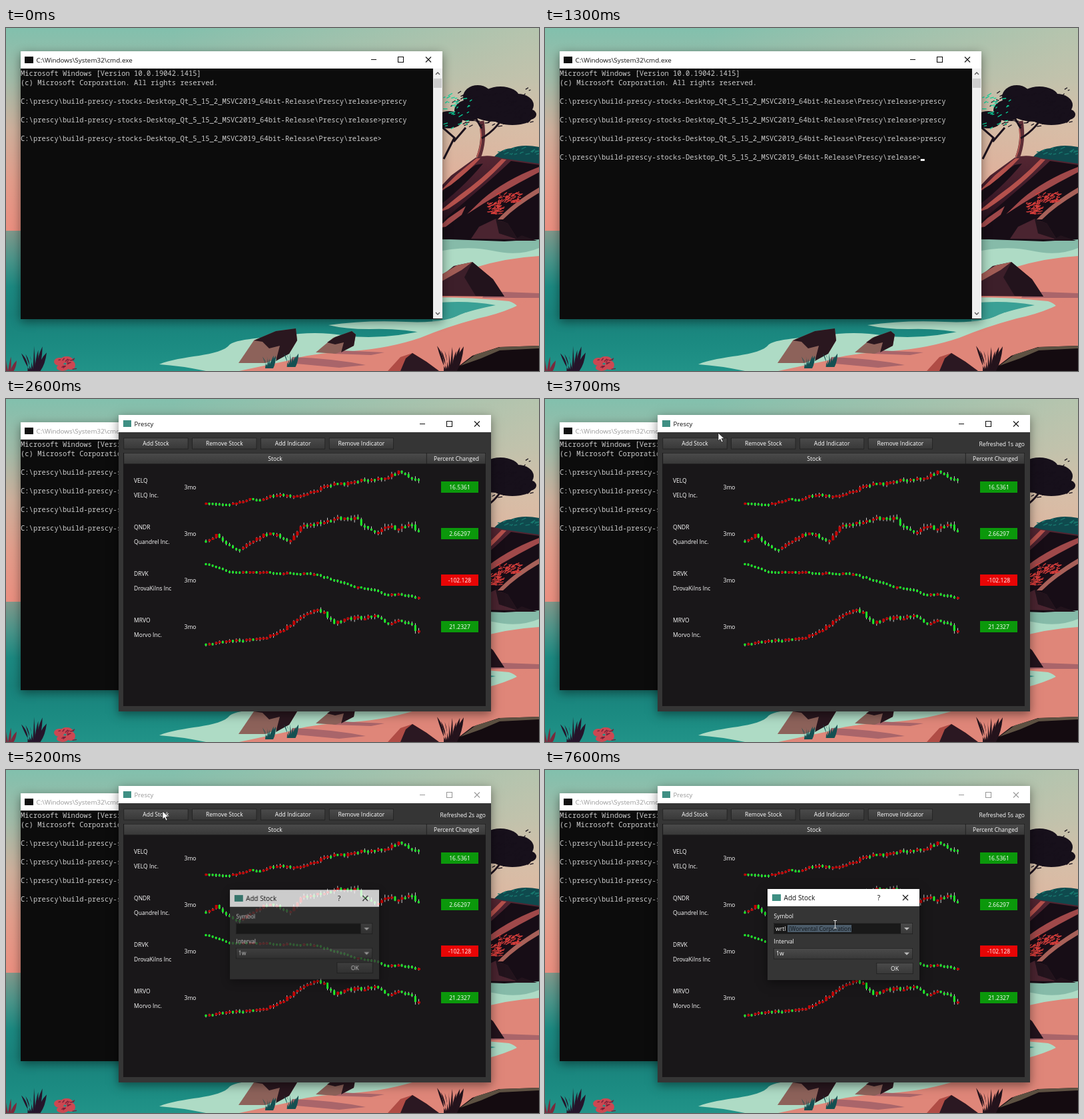
An HTML page with a canvas that plays this animation: 800 px wide and 516 px high, repeating every 8 s.

```html
<!DOCTYPE html>
<html lang="en">
<head>
<meta charset="utf-8">
<title>Stock watcher</title>
<style>
html, body { margin: 0; width: 100%; height: 100%; overflow: hidden; }
canvas { display: block; }
</style>
</head>
<body>
<canvas id="stage" width="800" height="516"></canvas>
<script>
const LOOP = 8000, STEP = 100;
const SANS = '"Open Sans", "Noto Sans", sans-serif';
const MONO = '"Noto Sans Mono", "DejaVu Sans Mono", monospace';
const PROMPT = 'C:\\prescy\\build-prescy-stocks-Desktop_Qt_5_15_2_MSVC2019_64bit-Release\\Prescy\\release>';
const STOCKS = [
  { symbol: 'VELQ', name: 'VELQ Inc.', change: '16.5361', noise: 6,
    ys: [157, 156, 158, 156, 150, 151, 146, 143, 146, 143, 138, 133, 128, 128, 123, 121, 120, 116, 109, 115, 124] },
  { symbol: 'QNDR', name: 'Quandrel Inc.', change: '2.66297', noise: 9,
    ys: [214, 204, 220, 227, 217, 207, 201, 207, 213, 187, 191, 183, 180, 181, 178, 193, 201, 186, 196, 184, 199] },
  { symbol: 'DRVK', name: 'DrovaKilns Inc', change: '-102.128', noise: 3,
    ys: [248, 253, 259, 259, 260, 260, 260, 262, 261, 262, 262, 267, 272, 277, 282, 285, 288, 295, 291, 296, 298] },
  { symbol: 'MRVO', name: 'Morvo Inc.', change: '21.2327', noise: 7,
    ys: [369, 366, 363, 363, 362, 360, 356, 350, 337, 325, 318, 319, 337, 332, 328, 330, 325, 336, 333, 340, 348] }
];
const MOUSE = [[3200, 330, 140], [3700, 260, 51], [4200, 240, 60], [4600, 235, 62], [5400, 235, 62], [6400, 435, 232]];

const stage = document.getElementById('stage').getContext('2d');
let g = stage, seed = 1;
const random = () => (seed = seed * 16807 % 2147483647) / 2147483647;
const newLayer = () => {
  const c = document.createElement('canvas');
  c.width = 800; c.height = 516;
  return c.getContext('2d');
};

function rect(x, y, w, h, fill) { g.fillStyle = fill; g.fillRect(x, y, w, h); }
function shape(fill, d) { g.fillStyle = fill; g.fill(new Path2D(d)); }
function line(color, width, d) { g.strokeStyle = color; g.lineWidth = width; g.stroke(new Path2D(d)); }
function gradient(y0, y1, ...colors) {
  const grad = g.createLinearGradient(0, y0, 0, y1);
  colors.forEach((c, i) => grad.addColorStop(i / (colors.length - 1), c));
  return grad;
}
function text(s, x, y, { size = 8.55, color = '#fff', align = 'left', font = SANS } = {}) {
  g.font = `${size}px ${font}`;
  g.fillStyle = color;
  g.textAlign = align;
  g.fillText(s, x, y + size * 0.357);
}
function ovals(fill, list) {
  g.fillStyle = fill;
  for (const [x, y, rx, ry] of list) {
    g.beginPath(); g.ellipse(x, y, rx, ry, 0, 0, 7); g.fill();
  }
}
function tuft(x, y, h, blades, fill) {
  for (let i = 0; i < blades; i++) {
    const a = (i / (blades - 1) - 0.5) * 2, len = h * (0.6 + 0.4 * random());
    shape(fill, `M${x + a * h * 0.2 - 2} ${y}Q${x + a * h * 0.2} ${y - len * 0.6} ${x + a * h * 0.5} ${y - len}Q${x + a * h * 0.4 + 2} ${y - len * 0.4} ${x + a * h * 0.2 + 2} ${y}z`);
  }
}
function speckle(color, n, x, y, w, h) {
  for (let i = 0; i < n; i++) {
    const px = x + random() * w, py = y + random() * h;
    line(color, 1.3, `M${px} ${py}l${2 + random() * 5} ${-random() * 4}`);
  }
}

function paintWallpaper() {
  seed = 11;
  rect(0, 0, 800, 306, gradient(0, 305, '#82c0ad', '#a0bba8', '#cfb09c', '#e39d8b', '#ea8f80'));
  const glow = g.createLinearGradient(250, 0, 780, 0);
  glow.addColorStop(0, 'rgba(222,200,175,0)');
  glow.addColorStop(1, 'rgba(222,200,175,.55)');
  rect(250, 0, 550, 306, glow);
  rect(0, 305, 800, 211, gradient(305, 516, '#80988b', '#4c958a', '#1c8981', '#19827b', '#1b8a81', '#219388'));

  // Far shore
  shape('#86bba9', 'M640 317H800V345L640 362z');
  shape('#aedbc5', 'M640 338Q690 326 730 335T800 331V360L640 402z');
  shape('#df8679', 'M800 343Q750 346 705 360L655 395L640 412L800 440z');

  // Foam and beach
  shape('#aedbc5', 'M640 405Q700 405 755 411Q775 418 765 428L690 446L640 468z');
  shape('#3aa095', 'M640 414Q690 409 735 417Q700 424 682 431Q660 442 640 445z');
  shape('#aedbc5', 'M484 447Q540 439 600 442T690 428V446L640 461Q590 451 545 453Q510 453 484 447z');
  shape('#aedbc5', 'M230 506C262 492 322 495 336 476C350 466 400 466 440 460Q475 457 510 463Q570 470 640 452V500L430 516H300Q262 508 230 506z');
  shape('#df8679', 'M800 398Q765 425 708 437Q660 450 622 466Q575 482 520 486Q452 490 425 500L350 516H800z');
  shape('#a9656a', 'M430 495Q490 497 540 507L500 511L425 504zM500 485L568 488L548 492L490 490zM720 396L800 399V406H715z');

  // Headland
  shape('#0f4a4e', 'M728 200Q740 182 758 181Q775 174 800 179V210H728z');
  speckle('#197a70', 18, 738, 182, 58, 10);
  shape(gradient(193, 318, '#552632', '#3a1927', '#170d16'), 'M640 252L668 222L705 195Q722 189 745 196L800 204V318H640z');
  shape('#170d16', 'M800 206L758 200Q735 222 702 250L658 288L640 306H800zM705 206L668 232L640 263V275Q685 242 716 204z');
  shape('#b4514c', 'M706 196L676 221L650 247L668 236Q694 216 712 196zM744 197Q715 227 680 252L648 278L664 272Q715 238 751 198z');
  shape('#a0494a', 'M800 209Q748 229 715 258L692 280Q740 248 800 217zM690 268L664 286L648 301L660 299L684 281z');
  shape('#a86159', 'M800 240Q762 262 738 288L746 288Q766 268 800 248z');
  speckle('#d93f3c', 55, 722, 264, 20, 16);
  speckle('#d93f3c', 55, 736, 249, 34, 14);
  shape('#170d16', 'M640 304H800V318L748 321L640 317z');
  shape('#4a2430', 'M698 317L710 299L735 287L753 294L768 318z');
  shape('#22131c', 'M735 287L753 294L768 318L740 309zM760 320L774 312L797 320z');

  // Trees
  line('#5c2c35', 7, 'M709 195Q719 170 714 140');
  line('#b05a54', 2, 'M707 194Q716 173 712 151');
  line('#1c121d', 3, 'M714 166Q739 151 750 126M714 151L697 121M657 197L673 165L650 145M672 171L690 150');
  ovals('#17101b', [[708, 104, 22, 18], [742, 103, 28, 15], [768, 116, 24, 17], [694, 124, 21, 16], [735, 126, 36, 15], [665, 138, 20, 13], [760, 137, 28, 9], [782, 130, 14, 9]]);
  speckle('#17101b', 110, 664, 92, 124, 58);
  speckle('#09d69c', 32, 656, 98, 40, 54);

  // Boulders
  shape('#3d1f2a', 'M640 403L650 376L672 358L700 352L731 378L748 404z');
  shape('#22131c', 'M700 352L731 378L748 404L705 403L688 375z');
  shape('#a05c55', 'M640 379L677 357L700 352L684 364L640 389z');
  shape('#8d625a', 'M349 504L372 470L405 456L435 452L437 470L425 490L390 504z');
  shape('#2a171f', 'M372 470L405 456L435 452L437 470L425 490L405 501L411 478L395 482L385 472z');
  shape('#8d625a', 'M465 488L491 466L519 456L525 461L522 478L495 490z');
  shape('#2a171f', 'M482 473L494 465L519 456L525 461L522 478L503 488L507 473L494 476z');
  shape('#b04c45', 'M573 516L592 495L610 489L631 502L650 516z');
  shape('#2b1822', 'M600 497L610 489L631 502L650 516H592z');
  shape('#140b10', 'M670 516L700 493L740 480L800 478V516z');
  shape('#5d5142', 'M682 508L705 491L742 480L800 478V482L741 485L713 497z');

  // Plants
  tuft(42, 516, 38, 7, '#25142a');
  tuft(3, 518, 26, 4, '#7a2a3c');
  tuft(667, 516, 40, 8, '#24131c');
  tuft(395, 512, 20, 7, '#155052');
  tuft(428, 510, 22, 6, '#155052');
  ovals('#cc4852', [[80, 502, 8, 6], [91, 499, 9, 5], [97, 507, 7, 7], [85, 511, 9, 5]]);
  speckle('#761f39', 13, 76, 496, 24, 20);
}

function frame(x, y, w, h, fill) {
  g.save();
  g.shadowColor = 'rgba(0,0,0,.45)';
  g.shadowBlur = 14;
  g.shadowOffsetY = 4;
  rect(x, y, w, h, fill);
  g.restore();
  rect(x, y, w, 26, '#fff');
}
function cross(x, y, color) { line(color, 1.1, `M${x - 4} ${y - 4}l8 8m0-8l-8 8`); }
function controls(x, y, color) {
  line(color, 1.1, `M${x - 4} ${y + 0.5}h8M${x + 36.5} ${y - 3.5}h8v8h-8z`);
  cross(x + 82, y + 0.5, color);
}
function panel(x, y, w, h, top = '#4b4b4b', bottom = '#383838') {
  rect(x, y, w, h, '#1d1d1d');
  rect(x + 0.7, y + 0.7, w - 1.4, h - 1.4, gradient(y, y + h, top, bottom));
}
function button(label, x, y, w, h) {
  panel(x, y, w, h);
  text(label, x + w / 2, y + h / 2, { align: 'center' });
}

function paintConsole(t) {
  const tint = t < 2400 ? '#111' : '#999';
  frame(22, 35, 633, 403, '#0c0c0c');
  rect(28, 43, 13, 10, '#111');
  text('C:\\Windows\\System32\\cmd.exe', 45.5, 48, { size: 9.85, color: tint });
  controls(552, 47, tint);
  rect(641, 61, 14, 376, '#f0f0f0');
  rect(642, 76, 12, 14, '#cdcdcd');
  line('#555', 1.3, 'M645 70l3-3l3 3M645 428l3 3l3-3');

  const typed = 'prescy'.slice(0, Math.max(0, (t - 400) / STEP));
  const lines = ['Microsoft Windows [Version 10.0.19042.1415]', '(c) Microsoft Corporation. All rights reserved.',
    '', PROMPT + 'prescy', '', PROMPT + 'prescy', '', PROMPT + typed];
  if (t >= 1200) lines.push('', PROMPT);
  lines.forEach((s, i) => text(s, 22, 68 + 14 * i, { size: 10.5, color: '#ccc', font: MONO }));
  const blinkOn = (t + 970) % 1060 < 530;
  if (blinkOn && t < 2400) rect(22 + 6.3 * lines.at(-1).length, 57 + 14 * lines.length, 6, 3, '#f2f2f2');
}

function paintCandles({ ys, noise }) {
  const count = 64;
  let last = ys[0] - 1;
  for (let i = 0; i < count; i++) {
    const u = i / (count - 1) * (ys.length - 1), k = Math.min(ys.length - 2, Math.floor(u));
    const spread = noise * (0.35 + 0.65 * i / count);
    const y = ys[k] + (ys[k + 1] - ys[k]) * (u - k) + (random() - 0.5) * spread;
    const x = 300 + i * 5.07, top = Math.min(y, last), height = Math.max(3, Math.abs(y - last));
    const up = random() * spread * 0.6, down = random() * spread * 0.6, rising = y < last;
    rect(x - 0.4, top - up, 0.9, height + up + down, '#ddd');
    rect(x - 1.5, top, rising ? 4 : 3, height, rising ? '#c40404' : '#1cf028');
    last = y;
  }
}

function paintApp(t) {
  const tint = t < 5100 ? '#111' : '#999';
  frame(169, 24, 559, 446, '#353535');
  rect(176, 32, 12, 10, '#3f8f83');
  text('Prescy', 192.5, 37.5, { size: 9.6, color: tint });
  controls(625, 37, tint);
  ['Add Stock', 'Remove Stock', 'Add Indicator', 'Remove Indicator']
    .forEach((label, i) => button(label, 176.5 + 102.8 * i, 58.5, 97, 17));
  if (t >= 3300) text(`Refreshed ${Math.floor((t - 2300) / 1000)}s ago`, 720, 67.5, { align: 'right' });

  rect(176, 81, 544, 381, '#191719');
  panel(176.5, 81, 455, 17);
  panel(631, 81, 89, 17);
  text('Stock', 404, 90, { align: 'center' });
  text('Percent Changed', 676, 90, { align: 'center' });
  seed = 77;
  STOCKS.forEach((stock, i) => {
    const y = 133 + 70 * i;
    text(stock.symbol, 192, y - 10);
    text(stock.name, 192, y + 11.5);
    text('3mo', 267.5, y);
    paintCandles(stock);
    rect(653, y - 9, 56, 17, stock.change[0] === '-' ? '#e80505' : '#0b980b');
    text(stock.change, 681, y, { align: 'center' });
  });
}

function paintDialog(t) {
  frame(334, 179, 228, 137, '#353535');
  rect(341, 187, 13, 10, '#3f8f83');
  text('Add Stock', 358.5, 192, { size: 10.1, color: '#111' });
  text('?', 501, 192, { size: 10.5, color: '#111', align: 'center' });
  cross(541, 192, '#111');
  text('Symbol', 343.5, 220);
  text('Interval', 343.5, 258);
  panel(343, 230, 209, 17);
  rect(344, 231, 190, 15, '#191919');
  panel(343, 268, 209, 16.5);
  shape('#bbb', 'M539 237h8l-4 4zM539 274.5h8l-4 4z');
  text('1w', 347, 276);
  button('OK', 497.5, 290, 55, 17);

  if (t >= 7600) {
    text('wrtl', 346, 239);
    rect(364, 233, 96, 11, '#4b5b69');
    text('(Worvental Corporation)', 366, 239, { color: '#12161a' });
  } else if (t >= 7000) {
    text(t < 7200 ? 'w' : 'wr', 346, 239);
  } else if (t > 5200 && (t - 5200) % 1060 < 530) {
    rect(346, 232, 1, 12, '#eee');
  }
}

function paintMouse(t) {
  if (t < MOUSE[0][0]) return;
  const next = MOUSE.findIndex(key => key[0] > t);
  let [, x, y] = MOUSE.at(-1);
  if (next > 0) {
    const [t0, x0, y0] = MOUSE[next - 1], [t1, x1, y1] = MOUSE[next];
    const p = (t - t0) / (t1 - t0), ease = p * p * (3 - 2 * p);
    x = x0 + (x1 - x0) * ease;
    y = y0 + (y1 - y0) * ease;
  }
  if (x > 343 && y > 229) {
    line('#ddd', 1, `M${x - 2} ${y - 5.5}h5M${x + 0.5} ${y - 5}v11M${x - 2} ${y + 6}h5`);
  } else {
    const arrow = `M${x} ${y}v12l3-2.6l2.2 4.7l2-1l-2.1-4.5h4z`;
    shape('#fff', arrow);
    line('#111', 0.7, arrow);
  }
}

// Windows open in three steps, growing and fading in together.
const scratch = newLayer();
function openWindow(paint, t, start, cx, cy) {
  if (t < start) return;
  const n = Math.min(3, (t - start) / STEP + 1), scale = 0.946 + 0.018 * n;
  g = scratch;
  g.clearRect(0, 0, 800, 516);
  paint(t);
  g = stage;
  g.save();
  g.globalAlpha = Math.min(1, 0.39 * n);
  g.translate(cx, cy);
  g.scale(scale, scale);
  g.drawImage(scratch.canvas, -cx, -cy);
  g.restore();
}

const wallpaper = g = newLayer();
paintWallpaper();
g = stage;

let shown = -1;
function tick(now) {
  const t = Math.floor(now % LOOP / STEP) * STEP;
  if (t !== shown) {
    shown = t;
    g.drawImage(wallpaper.canvas, 0, 0);
    paintConsole(t);
    openWindow(paintApp, t, 2400, 448.5, 247);
    openWindow(paintDialog, t, 5100, 448, 247.5);
    paintMouse(t);
  }
  requestAnimationFrame(tick);
}
tick(0);
</script>
</body>
</html>
```
